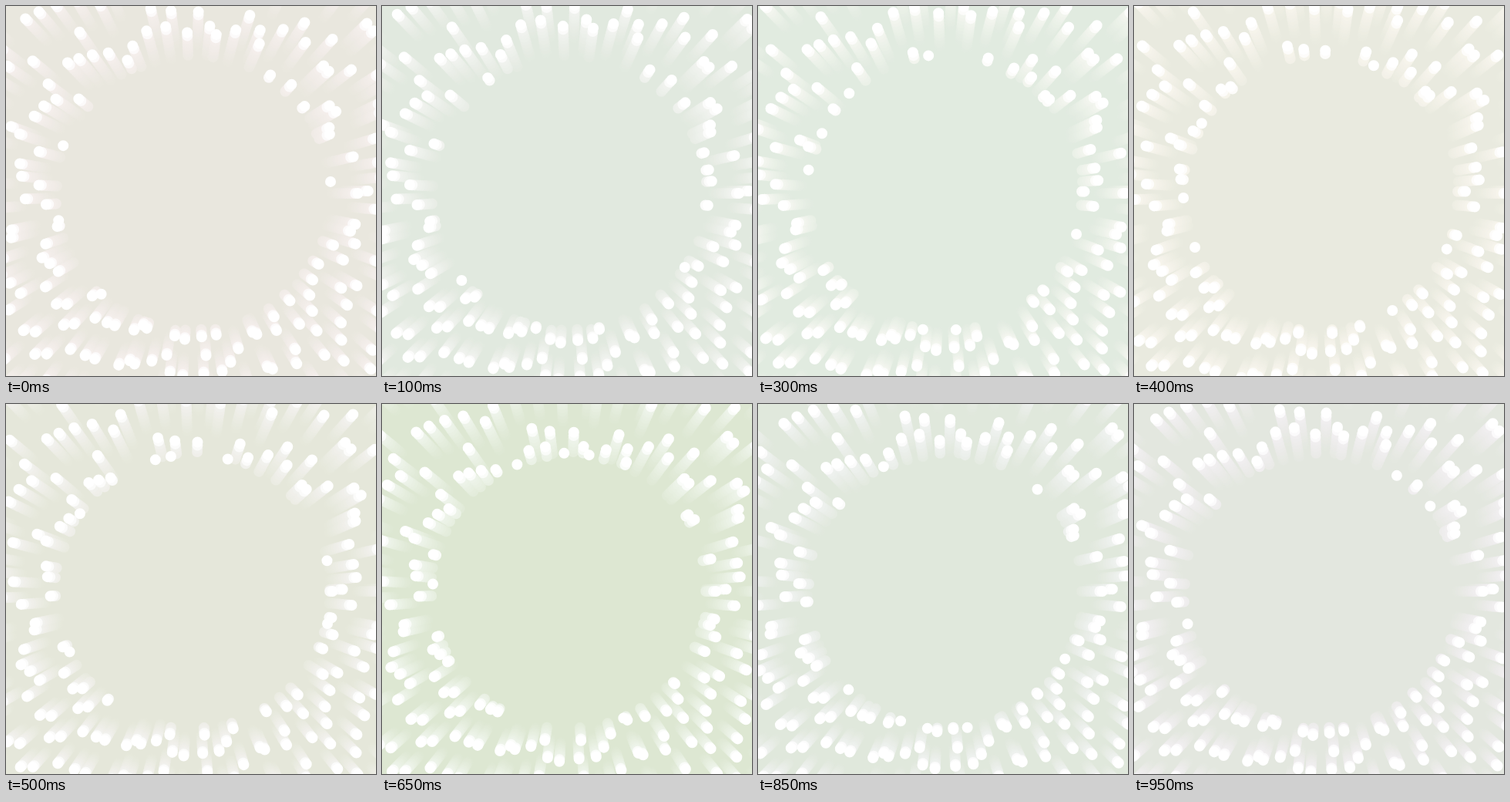
These frames come from a looping animation (480 by 480 pixels, 1 s). An HTML page with a canvas:

```html
<!DOCTYPE html>
<html lang="en">
<head>
<meta charset="utf-8">
<title>Radial burst</title>
<style>
html, body { margin: 0; width: 100%; height: 100%; overflow: hidden; background: #e9e7de; }
canvas { display: block; width: 100vw; height: 100vh; }
</style>
</head>
<body>
<canvas id="stage" width="480" height="480"></canvas>
<script>
const ctx = document.getElementById('stage').getContext('2d');
const LOOP = 1000, STEP = 50, SIZE = 480;
const CENTER = 243, RING = 177, REACH = 360, DOT = 7;
const RAYS = 92, TAIL = 10;
const WHITE = [255, 255, 255];

// Key colours over the loop: background and trail tint
const tones = [
  { at: 0, back: '#e9e7de', tint: '#f5efed' },
  { at: 200, back: '#d9ebe0', tint: '#f0f7f2' },
  { at: 400, back: '#e9eadf', tint: '#f8f5ed' },
  { at: 500, back: '#e5e7da', tint: '#f3f2ef' },
  { at: 650, back: '#dde7d2', tint: '#eff5ec' },
  { at: 750, back: '#dde8d8', tint: '#eef5f0' },
  { at: 950, back: '#e3e7df', tint: '#f2eff1' }
];

let seed = 11;
function random() {
  seed = (seed * 16807) % 2147483647;
  return seed / 2147483647;
}

// Rays spread evenly with some jitter; dots rise faster at the top
const rays = Array.from({ length: RAYS }, (_, i) => {
  const angle = (i + random() * 0.9) / RAYS * Math.PI * 2;
  return {
    dx: Math.cos(angle),
    dy: Math.sin(angle),
    speed: 0.066 - 0.018 * Math.sin(angle),
    birth: random() * LOOP
  };
});

const channels = hex => [1, 3, 5].map(i => parseInt(hex.slice(i, i + 2), 16));
const mix = (a, b, k) => a.map((v, i) => v + (b[i] - v) * k);
const css = c => `rgb(${c.map(Math.round).join(',')})`;

function tonesAt(time) {
  const i = tones.findLastIndex(tone => tone.at <= time);
  const from = tones[i];
  const to = tones[i + 1] || { ...tones[0], at: LOOP };
  const k = (time - from.at) / (to.at - from.at);
  return ['back', 'tint'].map(key => mix(channels(from[key]), channels(to[key]), k));
}

// Draws every dot where it stood a number of steps ago
function drawLayer(time, lag, colour) {
  ctx.fillStyle = css(colour);
  ctx.beginPath();
  for (const { dx, dy, speed, birth } of rays) {
    const first = (time - birth + LOOP) % LOOP - lag * STEP;
    for (let age = first; RING + age * speed < REACH; age += LOOP) {
      if (age < 0) continue;
      const r = RING + age * speed;
      const x = CENTER + dx * r, y = CENTER + dy * r;
      ctx.moveTo(x + DOT, y);
      ctx.arc(x, y, DOT, 0, Math.PI * 2);
    }
  }
  ctx.fill();
}

function draw(time) {
  const [back, tint] = tonesAt(time);
  ctx.fillStyle = css(back);
  ctx.fillRect(0, 0, SIZE, SIZE);
  for (let lag = TAIL; lag > 1; lag--) {
    const fade = (1 - (lag - 1) / TAIL) ** 1.2;
    drawLayer(time, lag, mix(back, tint, fade));
  }
  drawLayer(time, 1, mix(tint, WHITE, 0.7));
  drawLayer(time, 0, WHITE);
}

let start = null, shown = 0;
function tick(now) {
  start ??= now;
  const time = Math.floor(((now - start) % LOOP) / STEP) * STEP;
  if (time !== shown) draw(shown = time);
  requestAnimationFrame(tick);
}
draw(shown);
requestAnimationFrame(tick);
</script>
</body>
</html>
```
